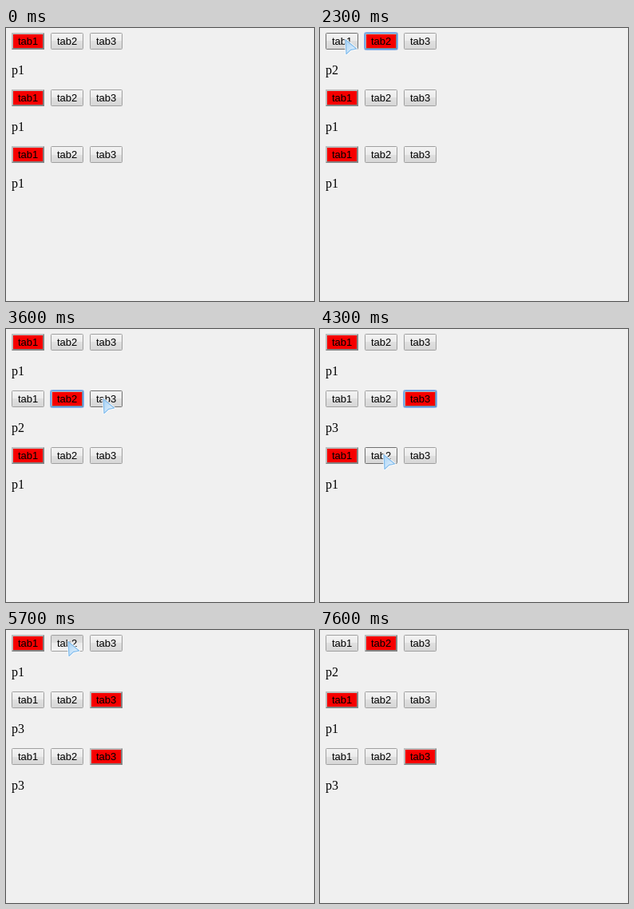
Recreate the animation shown at these times as an HTML page. Size 386 by 342 pixels, loop 8500 ms.

```html
<!DOCTYPE html>
<html lang="en">
<head>
<meta charset="utf-8">
<title>Tabs</title>
<style>
  html, body { margin: 0; width: 100%; height: 100%; overflow: hidden; background: #f0f0f0; }
  svg { display: block; width: 386px; height: 342px; }
  .label { font: 13px Arial, "Liberation Sans", sans-serif; }
  .panel { font: 16px "Liberation Serif", serif; }
</style>
</head>
<body>
<svg id="stage" viewBox="0 0 386 342">
  <defs>
    <linearGradient id="up" x2="0" y2="1">
      <stop offset="0" stop-color="#f3f3f3"/>
      <stop offset=".5" stop-color="#ebebeb"/>
      <stop offset=".5" stop-color="#e0e0e0"/>
      <stop offset="1" stop-color="#d6d6d6"/>
    </linearGradient>
    <linearGradient id="down" x2="0" y2="1">
      <stop offset="0" stop-color="#d6d6d6"/>
      <stop offset=".5" stop-color="#e0e0e0"/>
      <stop offset=".5" stop-color="#ebebeb"/>
      <stop offset="1" stop-color="#f3f3f3"/>
    </linearGradient>
    <linearGradient id="ice" x2="1" y2="1">
      <stop offset="0" stop-color="#a4d0f4"/>
      <stop offset="1" stop-color="#eef7fe"/>
    </linearGradient>
  </defs>
  <rect width="386" height="342" fill="#f0f0f0"/>
</svg>
<script>
const LOOP = 8500, STEP = 100;
const HOLD = 200, BLUR = 7500;
const W = 41, H = 21;
const stage = document.getElementById('stage');

const left = tab => 7 + 49 * tab;
const topOf = row => 6 + 71 * row;

// press time, row, tab
const clicks = [
  [700, 0, 1], [1500, 0, 2], [1800, 0, 1], [2400, 0, 0],
  [3200, 1, 1], [3700, 1, 2], [4400, 2, 1], [4900, 2, 2],
  [5600, 0, 1], [6500, 1, 0]
].map(([press, row, tab]) => ({ press, release: press + HOLD, row, tab, id: row * 3 + tab }));

// The pointer enters, rests on each button while it is held, then leaves.
const stops = [
  { from: 100, to: 200, x: 156, y: 105 },
  ...clicks.map(c => ({
    from: c.press, to: c.release, x: left(c.tab) + 20, y: topOf(c.row) + 7 + 2 * c.row
  })),
  { from: 7500, to: 7600, x: 336, y: 203 }
];

function set(el, attrs) {
  for (const k in attrs) el.setAttribute(k, attrs[k]);
}

function add(tag, attrs, parent = stage) {
  const el = document.createElementNS('http://www.w3.org/2000/svg', tag);
  set(el, attrs);
  parent.appendChild(el);
  return el;
}

const show = (el, on) => set(el, { visibility: on ? 'visible' : 'hidden' });

// One-pixel frame at a given inset from the button edge.
const frame = (inset, attrs, parent) => add('rect', {
  x: inset + .5, y: inset + .5, width: W - 1 - 2 * inset, height: H - 1 - 2 * inset,
  fill: 'none', ...attrs
}, parent);

function makeButton(row, tab) {
  const g = add('g', { transform: `translate(${left(tab)} ${topOf(row)})` });
  const face = frame(0, { rx: 1 }, g);
  const red = add('g', {}, g);
  add('path', { d: `M0 0H${W}L${W - 2} 2L2 ${H - 2}L0 ${H}Z`, fill: '#bcbcbc' }, red);
  add('path', { d: `M${W} 0V${H}H0L2 ${H - 2}L${W - 2} 2Z`, fill: '#848484' }, red);
  add('rect', { x: 2, y: 2, width: W - 4, height: H - 4, fill: '#f60000' }, red);
  const ring = add('g', {}, g);
  frame(-1, { rx: 2, stroke: '#8ab4ea' }, ring);
  frame(0, { rx: 1, stroke: '#5e9be6' }, ring);
  add('text', { x: 8, y: 15, class: 'label' }, g).textContent = 'tab' + (tab + 1);
  return { row, tab, face, red, ring };
}

const buttons = [], panels = [];
for (let row = 0; row < 3; row++) {
  for (let tab = 0; tab < 3; tab++) buttons.push(makeButton(row, tab));
  panels.push(add('text', { x: 7, y: topOf(row) + 52, class: 'panel' }));
}

const pointer = add('g', { 'stroke-linejoin': 'round' });
const arrow = 'M2 1.6L15.6 13L8.6 14.4L3 19.6Z';
add('path', { d: arrow, fill: 'none', stroke: '#fff', 'stroke-width': 3, opacity: .8 }, pointer);
add('path', { d: arrow, fill: 'url(#ice)', stroke: '#82bcec', 'stroke-width': 1.2 }, pointer);

function pointerAt(t) {
  const i = stops.findIndex(s => t < s.to);
  if (i < 0 || t < stops[0].from) return null;
  const b = stops[i], a = stops[i - 1] || b;
  if (t >= b.from) return [b.x, b.y];
  const k = (t - a.to) / (b.from - a.to);
  const ease = 1 - (1 - k) ** 2;
  return [Math.round(a.x + (b.x - a.x) * ease), Math.round(a.y + (b.y - a.y) * ease)];
}

function stateAt(t) {
  const s = { active: [0, 0, 0], focus: null, pressed: null };
  for (const c of clicks) {
    if (t < c.press) break;
    s.focus = null;
    if (t < c.release) {
      s.pressed = c.id;
    } else {
      s.active[c.row] = c.tab;
      s.focus = c.id;
    }
  }
  if (t >= BLUR) s.focus = null;
  return s;
}

function over(pos, row, tab) {
  if (!pos) return false;
  const x = pos[0] + 1 - left(tab), y = pos[1] + 1 - topOf(row);
  return x >= 0 && x < W && y >= 0 && y < H;
}

function draw(t) {
  const s = stateAt(t), pos = pointerAt(t);
  buttons.forEach((b, id) => {
    const down = s.pressed === id;
    set(b.face, {
      fill: down ? 'url(#down)' : 'url(#up)',
      stroke: !down && over(pos, b.row, b.tab) ? '#707070' : '#a0a0a0'
    });
    show(b.red, s.active[b.row] === b.tab);
    show(b.ring, s.focus === id);
  });
  panels.forEach((p, row) => { p.textContent = 'p' + (s.active[row] + 1); });
  show(pointer, pos);
  if (pos) set(pointer, { transform: `translate(${pos})` });
}

const start = performance.now();
function tick() {
  const t = (performance.now() - start) % LOOP;
  draw(Math.floor(t / STEP) * STEP);
  requestAnimationFrame(tick);
}
draw(0);
requestAnimationFrame(tick);
</script>
</body>
</html>
```
